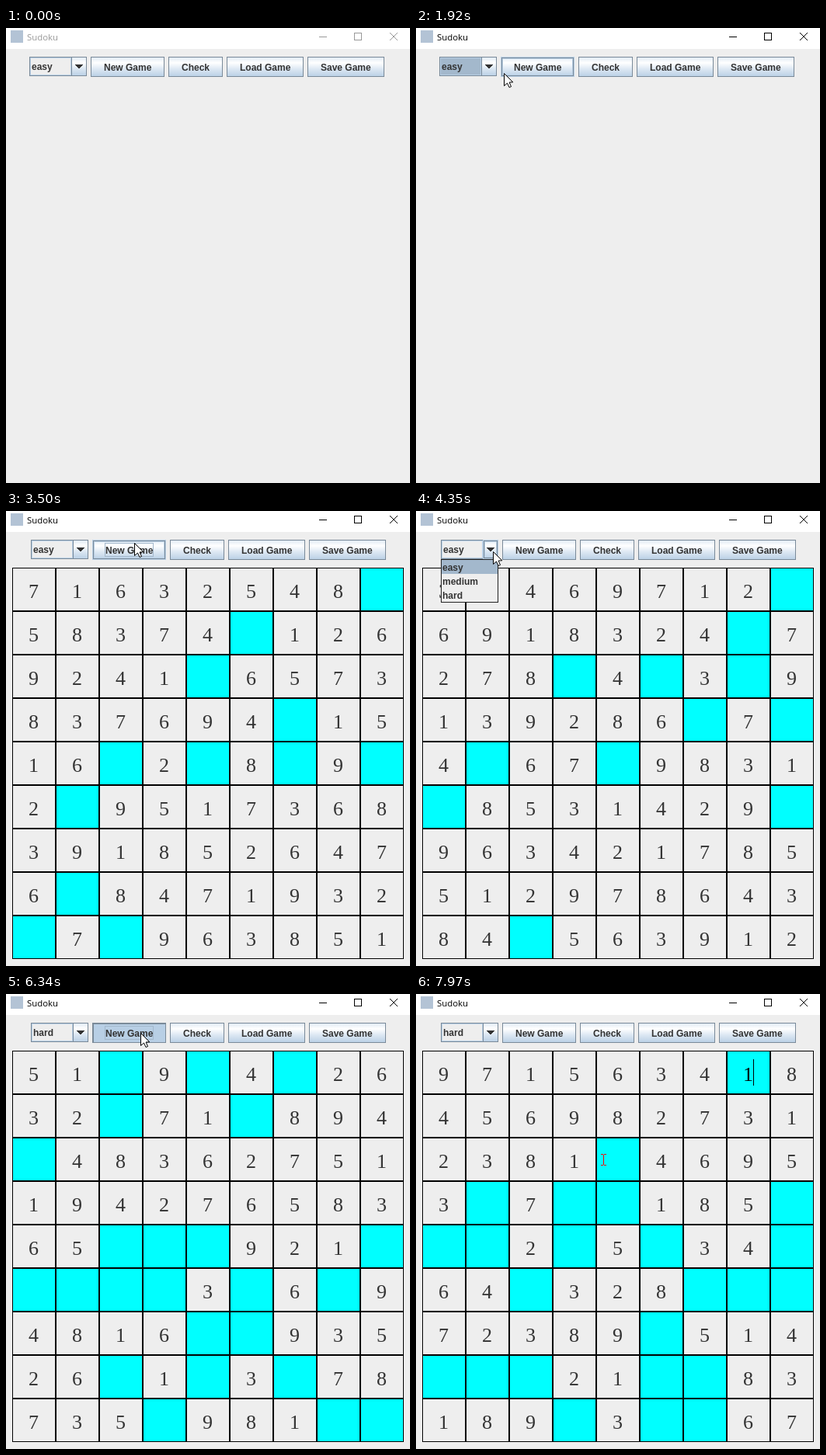
Write an HTML page with a canvas that moves like this. It is 520 by 586 pixels and loops after 8 s.

```html
<!DOCTYPE html>
<html lang="en">
<head>
<meta charset="utf-8">
<title>Sudoku</title>
<style>
html, body { margin: 0; width: 100%; height: 100%; overflow: hidden; background: #eee; }
canvas { display: block; }
</style>
</head>
<body>
<canvas id="stage" width="520" height="586"></canvas>
<script>
const g = document.getElementById('stage').getContext('2d');
const LOOP = 8000, CELL = 56;
const BORDER = '#7a8a99', LIGHT = '#b8cfe5', SELECT = '#a3b8cc', PANEL = '#eee', INK = '#333';
const BOLD = 'bold 12px "Liberation Sans", Arial, sans-serif';
const DIGIT = '26px "Liberation Serif", "Times New Roman", serif';
const LEVELS = ['easy', 'medium', 'hard'];
const LABELS = ['New Game', 'Check', 'Load Game', 'Save Game'];

// Clues are digits, "-" is filled in by the solver, "." stays an empty cell.
const PUZZLES = [
  [2330, '-1-3-5-8. 5-3-4.1-6 -2-1.6-7- 8-7-9-.-5 -6.2.8.9. 2.9-1-3-8 -9-8-2-4- 6.8-7-9-2 .7.9-3-5-'],
  [3930, '354-9-1-. -9-8-2-.- 2-8.4.3.9 -3-2-6.7. 4.6-.-8-1 .8-3-4-9. 9-3-2-7-5 51-9-8-4- 8-.-6-9-2'],
  [5500, '-1.9.4.2- 3-.-1.8-4 .4-3-2-5- 1-4-7-5-3 -5...9-1. ....3.6.9 -8-6..-3- 2-.-.-.-8 7-5.9-1..'],
  [6410, '9-1-6-4.8 45-9-2-3- 2-8-.-6-5 -.-..1-5. ..2.5.3-. -4.3-8... 7-3-9.5-4 ...2-..8- 1-9.3..-7']
];

const range = n => [...Array(n).keys()];
const samePeer = (a, b) => {
  const [r, c, s, d] = [Math.floor(a / 9), a % 9, Math.floor(b / 9), b % 9];
  return r === s || c === d || (Math.floor(r / 3) === Math.floor(s / 3) && Math.floor(c / 3) === Math.floor(d / 3));
};
const PEERS = range(81).map(a => range(81).filter(b => b !== a && samePeer(a, b)));

// Backtracking from the cell with the fewest candidates.
function solve(grid) {
  let best = null;
  grid.forEach((value, i) => {
    if (value) return;
    const used = new Set(PEERS[i].map(j => grid[j]));
    const options = range(10).filter(n => n && !used.has(n));
    if (!best || options.length < best.options.length) best = { i, options };
  });
  if (!best) return grid;
  for (const n of best.options) {
    const done = solve(grid.map((v, i) => i === best.i ? n : v));
    if (done) return done;
  }
  return null;
}

const BOARDS = PUZZLES.map(([at, clues]) => {
  const marks = [...clues.replaceAll(' ', '')];
  const solved = solve(marks.map(ch => Number(ch) || 0));
  return { at, cells: marks.map((ch, i) => ch === '.' ? '' : String(solved[i])) };
});

// Pointer moves: start time, end time, target x, target y.
const MOVES = [
  [90, 300, 173, 241], [510, 1270, 95, 46], [1450, 1600, 78, 72], [1720, 1920, 113, 58],
  [1920, 2110, 131, 33], [2110, 2180, 143, 38], [3130, 3500, 165, 41], [3930, 4300, 99, 52],
  [4370, 4540, 80, 114], [4610, 5200, 173, 50], [6670, 7050, 390, 146], [7050, 7420, 431, 96],
  [7640, 7940, 241, 213]
];
const PRESSES = [[2110, 2330], [3860, 3930], [5400, 5500], [6210, 6410]];
const POPUPS = [[1320, 1700], [4330, 4600]];
const ACTIVE_AT = 1290, HARD_AT = 4600, CELL_CLICK = 7440, TYPE_AT = 7520;

const within = (t, spans) => spans.some(([a, b]) => t >= a && t < b);
const inBox = (p, x, y, w, h) => p && p.x >= x && p.x < x + w && p.y >= y && p.y < y + h;

function fill(color, x, y, w, h) {
  g.fillStyle = color;
  g.fillRect(x, y, w, h);
}

function frame(color, x, y, w, h) {
  g.strokeStyle = color;
  g.lineWidth = 1;
  g.strokeRect(x + 0.5, y + 0.5, w - 1, h - 1);
}

function text(str, x, y, font = BOLD, color = INK) {
  g.font = font;
  g.fillStyle = color;
  g.fillText(str, x, y);
}

function pointerAt(t) {
  if (t < MOVES[0][0]) return null;
  let x = 416, y = 561;
  for (const [from, to, tx, ty] of MOVES) {
    const k = Math.max(0, Math.min(1, (t - from) / (to - from)));
    const ease = k * k * (3 - 2 * k);
    x += (tx - x) * ease;
    y += (ty - y) * ease;
  }
  return { x: Math.round(x), y: Math.round(y) };
}

function focusAt(t) {
  if (t < ACTIVE_AT) return '';
  if (t >= CELL_CLICK) return 'cell';
  const lastStart = spans => Math.max(0, ...spans.map(s => s[0]).filter(a => a <= t));
  return lastStart(PRESSES) > lastStart(POPUPS) ? 'new' : 'combo';
}

function titleBar(active) {
  const color = active ? '#000' : '#999';
  fill('#fff', 0, 0, 520, 27);
  fill('#b3c3d5', 6, 3, 16, 16);
  text('Sudoku', 27, 16, '11.4px "Open Sans", "Noto Sans", sans-serif', color);
  fill(color, 403, 11, 10, 1);
  frame(color, 448, 6, 10, 10);
  g.strokeStyle = color;
  g.beginPath();
  g.moveTo(494, 6); g.lineTo(504, 16);
  g.moveTo(504, 6); g.lineTo(494, 16);
  g.stroke();
}

function buttonFace(x, y, w, h, hover, pressed) {
  const shade = g.createLinearGradient(0, y, 0, y + h);
  shade.addColorStop(0, '#dde8f3');
  shade.addColorStop(0.3, '#fff');
  shade.addColorStop(0.6, '#dde8f3');
  shade.addColorStop(1, LIGHT);
  fill(pressed ? LIGHT : shade, x, y, w, h);
  if (hover && !pressed) {
    frame(LIGHT, x, y, w, h);
    frame(LIGHT, x + 2, y + 2, w - 4, h - 4);
    frame(BORDER, x + 1, y + 1, w - 2, h - 2);
  } else {
    frame(BORDER, x, y, w, h);
  }
  if (pressed) {
    fill(BORDER, x, y, w, 2);
    fill(BORDER, x, y, 2, h);
  }
}

function combo(t, p, x, focused) {
  fill(focused ? SELECT : PANEL, x, 37, 55, 25);
  frame(LIGHT, x + 1, 38, 53, 23);
  frame(BORDER, x, 37, 55, 25);
  buttonFace(x + 54, 37, 20, 25, inBox(p, x, 37, 74, 25), false);
  for (let i = 0; i < 5; i++) fill(INK, x + 59 + i, 47 + i, 10 - 2 * i, 1);
  text(t < HARD_AT ? 'easy' : 'hard', x + 3, 54);
}

function toolbar(t, p, left, open) {
  const focus = focusAt(t);
  combo(t, p, left, focus === 'combo' && !open);
  let x = left + 79;
  LABELS.forEach((label, i) => {
    g.font = BOLD;
    const textWidth = Math.round(g.measureText(label).width), w = textWidth + 34;
    buttonFace(x, 37, w, 26, !open && inBox(p, x, 37, w, 26), i === 0 && within(t, PRESSES));
    if (i === 0 && focus === 'new') frame(SELECT, x + 16, 41, textWidth + 2, 18);
    text(label, x + 17, 55);
    x += w + 5;
  });
}

function popup(p, x) {
  const row = Math.max(0, Math.min(2, Math.floor((p.y - 63) / 18)));
  fill(PANEL, x, 62, 74, 56);
  fill(SELECT, x + 1, 63 + row * 18, 72, 18);
  frame('#222', x, 62, 74, 56);
  LEVELS.forEach((name, i) => text(name, x + 2, 77 + i * 18));
}

function drawBoard(board, t) {
  board.cells.forEach((digit, i) => {
    const x = 8 + (i % 9) * CELL, y = 73 + Math.floor(i / 9) * CELL;
    fill(digit ? PANEL : '#0ff', x, y, CELL, CELL);
    frame('#000', x, y, CELL, CELL);
    text(digit, x + 21, y + 39, DIGIT);
  });
  if (t >= TYPE_AT) text('1', 421, 112, DIGIT, '#000');
  if (t >= CELL_CLICK) fill('#000', t < TYPE_AT ? 427 : 434, 84, 1, 34);
}

function arrow({ x, y }) {
  g.save();
  g.translate(x + 0.5, y + 0.5);
  g.beginPath();
  [[0, 0], [0, 16], [4, 12.5], [6.5, 18], [9, 17], [6.6, 11.5], [11.3, 11.3]].forEach(([a, b]) => g.lineTo(a, b));
  g.closePath();
  g.fillStyle = '#fff';
  g.strokeStyle = '#000';
  g.lineWidth = 1;
  g.fill();
  g.stroke();
  g.restore();
}

function textPointer({ x, y }) {
  fill('#f00', x, y - 6, 1, 13);
  for (const edge of [y - 7, y + 7]) {
    fill('#f00', x - 3, edge, 3, 1);
    fill('#f00', x + 1, edge, 3, 1);
  }
}

function overEmpty(board, p) {
  if (!board || !inBox(p, 8, 73, 9 * CELL, 9 * CELL)) return false;
  return !board.cells[Math.floor((p.y - 73) / CELL) * 9 + Math.floor((p.x - 8) / CELL)];
}

function draw(t) {
  const p = pointerAt(t);
  const board = BOARDS.filter(b => b.at <= t).pop();
  const left = board ? 32 : 30, open = within(t, POPUPS);
  fill(PANEL, 0, 0, 520, 586);
  titleBar(t >= ACTIVE_AT);
  toolbar(t, p, left, open);
  if (board) drawBoard(board, t);
  if (open) popup(p, left);
  if (p) (!open && overEmpty(board, p) ? textPointer : arrow)(p);
}

const start = performance.now();
function tick() {
  draw((performance.now() - start) % LOOP);
  requestAnimationFrame(tick);
}
tick();
</script>
</body>
</html>
```
